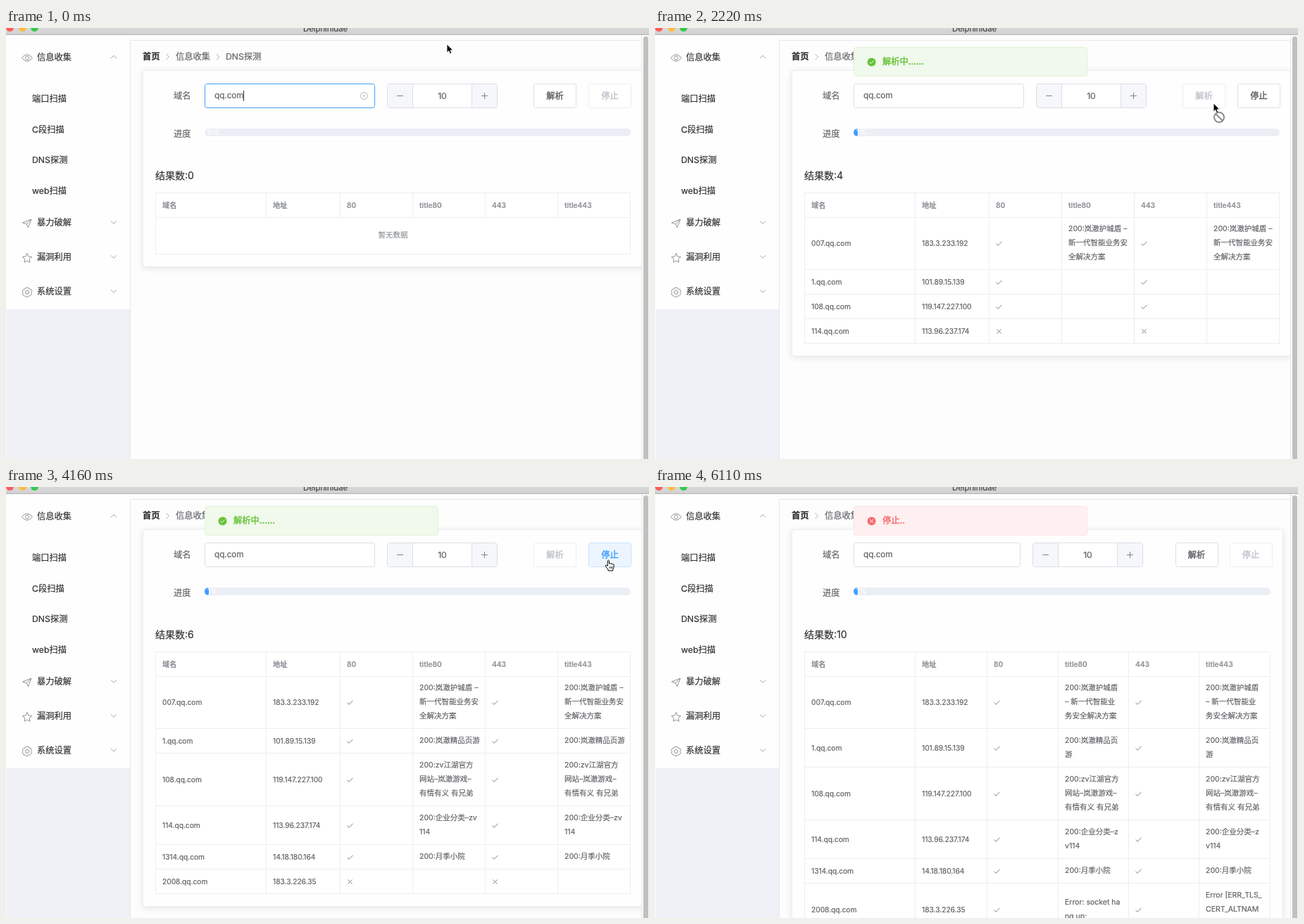
An HTML page for the animation above (6410 ms loop, 913x613 px).

```html
<!DOCTYPE html>
<html lang="zh-CN">
<head>
<meta charset="utf-8">
<title>DNS探测</title>
<style>
html, body { margin: 0; width: 100%; height: 100%; overflow: hidden; }
body { position: relative; background: #fdfdfd; color: #606266; -webkit-text-stroke: .2px;
  font: 12.25px/20px Inter, "Noto Sans CJK SC", "Noto Sans CJK", sans-serif; }
body * { box-sizing: border-box; }
.a, .t, .btn, svg { position: absolute; }
.t { white-space: nowrap; }
svg { overflow: visible; fill: none; stroke: #909399; left: 0; top: 0; }
.dark { color: #303133; }
#bar { left: 0; top: 0; width: 913px; height: 10px; overflow: hidden; z-index: 5;
  background: linear-gradient(#d9d8d9, #d2d1d2); border-bottom: 1px solid #b4b3b4; }
#bar i { position: absolute; top: -6px; width: 11px; height: 11px; border-radius: 50%; }
#page { left: 0; top: 0; width: 902px; height: 613px; overflow: hidden; clip-path: inset(10px 0 0 0); }
#card { left: 194px; top: 60px; background: #fefefe; border: 1px solid #ebeef5;
  border-radius: 4px; box-shadow: 0 2px 10px rgba(0, 0, 0, .1); }
.box, .btn { top: 78.5px; height: 35px; border: 1px solid #dcdfe6; border-radius: 3.5px; background: #fff; }
#num { width: 157px; text-align: center; line-height: 33px; overflow: hidden; }
#num b { position: absolute; top: 0; width: 36px; height: 100%; background: #f5f7fa; }
#num b::before, #num b.plus::after { content: ""; position: absolute; left: 13px; top: 16px;
  width: 9px; height: 1px; background: #7f8288; }
#num b.plus::after { transform: rotate(90deg); }
.btn { width: 61px; text-align: center; line-height: 33px; }
.btn, #msg { font-weight: 500; -webkit-text-stroke: .45px; }
.btn.off { color: #c0c4cc; border-color: #ebeef5; }
.btn.hover { color: #409eff; border-color: #c6e2ff; background: #ecf5ff; }
.btn.press { color: #3a8ee6; border-color: #3a8ee6; background: #ecf5ff; }
.btn.fade { color: #b1bdd6; border-color: #d3e3fb; }
#track { left: 282px; top: 143px; height: 11px; border-radius: 6px; background: #ebeef5; overflow: hidden; }
#fill { height: 11px; border-radius: 6px; background: #409eff; }
#track span { position: absolute; left: 4px; top: -3px; line-height: 18px; color: #fff; font-size: 10.5px; }
#table { left: 212px; top: 234px; border: solid #ebeef5; border-width: 1px 0 0 1px; font-size: 10.2px; background: #fff; }
.row { display: grid; }
.row > div { display: flex; align-items: center; padding: 7px 0 7px 9px; white-space: nowrap;
  border: solid #ebeef5; border-width: 0 1px 1px 0; }
.head { color: #909399; font-weight: 600; height: 34px; }
.cjk { font-size: 10.5px; }
.row svg { position: static; width: 9px; height: 9px; stroke: #7d8087; }
.row .none { display: block; grid-column: 1 / -1; text-align: center; height: 53px;
  padding: 16px 0; color: #909399; font-size: 10.5px; }
#msg { left: 282px; top: 27px; width: 332px; height: 42px; border: 1px solid; border-radius: 3.5px;
  padding-left: 40px; line-height: 40px; }
#msg svg { left: 18px; top: 14px; stroke: #fff; }
#msg.ok { background: #f0f9eb; border-color: #e1f3d8; color: #67c23a; }
#msg.bad { background: #fef0f0; border-color: #fde2e2; color: #f56c6c; }
#msg circle { fill: currentColor; stroke: none; }
#pointer { left: 0; top: 0; z-index: 6; }
</style>
</head>
<body>
<div id="bar" class="a">
  <i style="left:0;background:#fc5b57"></i><i style="left:18px;background:#fdbc40"></i><i style="left:35px;background:#34c84a"></i>
  <span class="t" style="left:422px;top:-9.5px;font-size:11.3px;color:#454545">Delphinidae</span>
</div>

<div id="page" class="a">
  <div class="a" style="left:0;top:16.5px;width:902px;height:1px;background:#e8e8ea"></div>
  <div class="a" style="left:1px;top:17px;width:176px;height:596px;background:#eef0f6;border-right:1px solid #e4e6ea"></div>
  <div class="a" style="left:1px;top:17px;width:175px;height:383px;background:#fefefe"></div>
  <div id="menu"></div>
  <svg width="180" height="400">
    <path d="M22.5 42.5Q30 33 37.5 42.5Q30 52 22.5 42.5Z"/><circle cx="30" cy="42.5" r="2.6"/>
    <path d="M23.5 277 36 272 31.5 284 29.3 278.8ZM29.3 278.8 36 272"/>
    <path d="M30 320.5 32 325 36.5 325.5 33.2 328.7 34 333.3 30 331 26 333.3 26.8 328.7 23.5 325.5 28 325Z"/>
    <circle cx="30" cy="376" r="2.6"/>
    <path d="M28 369.5H32L33 371.3 35.3 371.6 36.8 374.6 35.6 376.2 36.5 378.3 34.4 381 32.4 381.2 31 382.5H28.5L27 381.2 25 380.8 23.3 378 24.3 376.2 23.2 374.2 24.8 371.6 27 371.3Z"/>
    <path d="M149 43 153 39.2 157 43M149 274.5 153 278.3 157 274.5M149 323.5 153 327.3 157 323.5M149 372.5 153 376.3 157 372.5" stroke-opacity=".8"/>
  </svg>
  <b class="t dark" style="left:194px;top:31px">首页</b>
  <span class="t" style="left:241px;top:31px">信息收集</span>
  <span class="t" style="left:312px;top:31px">DNS探测</span>
  <svg width="320" height="60" stroke-opacity=".75"><path d="M227.5 37 231.5 41 227.5 45M299 37 303 41 299 45"/></svg>

  <div id="card" class="a"></div>
  <span class="t" style="left:238px;top:86.5px">域名</span>
  <span class="t" style="left:238px;top:140.5px">进度</span>
  <div id="field" class="a box" style="left:282px">
    <span class="t" style="left:13px;top:6px;font-size:11.7px">qq.com</span>
    <i id="caret" class="a" style="left:54px;top:9px;width:1px;height:15px;background:#303133"></i>
    <svg id="clear" style="left:220px;top:11.5px" width="11" height="11" stroke-opacity=".7"><circle cx="5.5" cy="5.5" r="5"/><path d="M3.8 3.8 7.2 7.2M7.2 3.8 3.8 7.2"/></svg>
  </div>
  <div id="num" class="a box"><b style="left:0;border-right:1px solid #dcdfe6"></b>10<b class="plus" style="right:0;border-left:1px solid #dcdfe6"></b></div>
  <div id="parse">解析</div>
  <div id="stop">停止</div>
  <div id="track" class="a"><div id="fill"></div><span id="pct"></span></div>
  <span id="count" class="t dark" style="left:212px;top:200px;font-size:14px"></span>
  <div id="table" class="a"></div>
  <div id="msg" class="a"></div>
</div>

<div class="a" style="left:902px;top:10px;width:11px;height:603px;background:#fafafa;border-left:1px solid #e6e6e6"></div>
<div class="a" style="left:905px;top:12px;width:7px;height:610px;background:#c0c0c0;border-radius:4px"></div>
<svg id="pointer" width="30" height="40"></svg>

<script>
const $ = id => document.getElementById(id);
const LOOP = 6410;

const menu = [[44, 42, '信息收集'], [37, 101, '端口扫描'], [37, 145, 'C段扫描'], [37, 188, 'DNS探测'],
  [37, 232, 'web扫描'], [44, 277, '暴力破解'], [44, 326, '漏洞利用'], [44, 375, '系统设置']];
$('menu').innerHTML = menu.map(([x, y, s]) =>
  `<span class="t dark" style="left:${x}px;top:${y - 10}px">${s}</span>`).join('');

// host, address, title lines in the wide and the narrow layout, narrow title443 if different
const hosts = [
  ['007', '183.3.233.192', '200:岚澈护城盾 –|新一代智能业务安|全解决方案', '200:岚澈护城盾|– 新一代智能业|务安全解决方案'],
  ['1', '101.89.15.139', '200:岚澈精品页游', '200:岚澈精品页|游'],
  ['108', '119.147.227.100', '200:zv江湖官方|网站–岚澈游戏–|有情有义 有兄弟', '200:zv江湖官方|网站–岚澈游戏–|有情有义 有兄弟'],
  ['114', '113.96.237.174', '200:企业分类–zv|114', '200:企业分类–z|v114'],
  ['1314', '14.18.180.164', '200:月季小院', '200:月季小院'],
  ['2008', '183.3.226.35', '', 'Error: socket ha|ng up;', 'Error [ERR_TLS_|CERT_ALTNAM|E_INVALID]']
];
const heads = ['域名', '地址', '80', 'title80', '443', 'title443'];

const wide = { cols: [157, 105, 103, 103, 103, 103], field: 242, num: 541, parse: 749, stop: 827, track: 605, card: 710 };
const narrow = { cols: [157, 102, 101, 100, 100, 101], field: 237, num: 536, parse: 738.5, stop: 815.5, track: 592, card: 698 };

const icon = d => `<svg viewBox="0 0 9 9"><path d="${d}"/></svg>`;
const tick = icon('M.5 4.8 3.2 7.3 8.5 1.8');
const cross = icon('M1.5 1.5 7.5 7.5M7.5 1.5 1.5 7.5');

const arrow = '<path d="M0 0V12.2L2.8 9.6 4.6 13.8 6.8 12.8 5 8.8H8.8Z" fill="#000" stroke="#fff" stroke-width=".9"/>';
const shapes = {
  arrow,
  deny: arrow + '<circle cx="8" cy="20" r="7" fill="#fff" stroke="#8c8c8c" stroke-width="2"/><path d="M3 15 13 25" stroke="#8c8c8c" stroke-width="2"/>',
  hand: '<path d="M-2.2 8.5V1Q-1.2-.8 0 1V5Q1.2 4 2.4 5.3 3.6 4.4 4.6 5.8 6.4 5.2 6.6 7V10Q6.4 12 5.2 13V15H-1.6V13.4L-5.4 8.6Q-5.4 6.6-3.4 7.4Z" fill="#fff" stroke="#000"/><path d="M.6 9V12M2.6 9V12M4.4 9V12" stroke="#000" stroke-width=".8"/>'
};
const notes = {
  ok: ['解析中......', 'M3.6 6.6 5.6 8.5 9.4 4.6'],
  bad: ['停止..', 'M4.2 4.2 8.8 8.8M8.8 4.2 4.2 8.8']
};

// rows: one digit per host, 0 = closed, 1 = open, 2 = open with title
// msg: kind, vertical offset, opacity
const steps = [
  [0, { lay: wide, focus: 1, caret: 1, ptr: ['arrow', 626, 23], parse: '', stop: 'off', pct: 0, fill: 0, count: 0, rows: '', msg: null }],
  [450, { ptr: ['arrow', 634, 34] }],
  [600, { caret: 0, ptr: ['arrow', 668, 72] }],
  [750, { ptr: ['arrow', 722, 124] }],
  [890, { ptr: ['arrow', 782, 158] }],
  [1040, { caret: 1, ptr: ['arrow', 818, 150] }],
  [1190, { ptr: ['arrow', 814, 128] }],
  [1330, { ptr: ['hand', 798, 110], parse: 'hover' }],
  [1480, { ptr: ['hand', 793, 107] }],
  [1630, { focus: 0, parse: 'press' }],
  [1780, { ptr: ['deny', 793, 107], parse: 'fade', stop: '', pct: 1, count: 1, rows: '0', msg: ['ok', -43, .35] }],
  [1930, { parse: 'off', fill: 2, count: 2, rows: '10', msg: ['ok', -12, .85] }],
  [2070, { fill: 5, count: 4, rows: '1110', msg: ['ok', -1, 1] }],
  [2220, { fill: 6, rows: '2110', msg: ['ok', 0, 1] }],
  [2520, { ptr: ['deny', 800, 107], rows: '2210' }],
  [2670, { ptr: ['arrow', 818, 108] }],
  [2820, { ptr: ['hand', 840, 107], stop: 'hover', rows: '2220' }],
  [2960, { ptr: ['hand', 853, 105], count: 5, rows: '22210' }],
  [3110, { ptr: ['hand', 856.5, 104] }],
  [3260, { rows: '22220' }],
  [4160, { count: 6, rows: '222220' }],
  [4310, { lay: narrow, count: 8, rows: '222222' }],
  [4460, { count: 10, msg: ['ok', -10, .75] }],
  [4610, { msg: ['ok', -29.5, .16] }],
  [4760, { msg: null }],
  [5360, { ptr: ['deny', 857, 105], parse: '', stop: 'off', msg: ['bad', -30, .2] }],
  [5510, { msg: ['bad', -5, .9] }],
  [5660, { ptr: ['arrow', 835, 170], msg: ['bad', 0, 1] }],
  [5810, { ptr: ['arrow', 770, 310] }],
  [5960, { ptr: ['arrow', 725, 409] }],
  [6110, { ptr: null }]
];
steps.forEach((s, i) => { if (i) s[1] = { ...steps[i - 1][1], ...s[1] }; });

const lines = s => `<span class="cjk">${s.replace(/\|/g, '<br>')}</span>`;

function tableHtml({ lay, rows }) {
  const row = (cells, cls = '') => `<div class="row ${cls}" style="grid-template-columns:${lay.cols.map(c => c + 'px').join(' ')}">` +
    cells.map(c => `<div>${c}</div>`).join('') + '</div>';
  const body = [...rows].map((level, i) => {
    const [host, ip, long, short, alt] = hosts[i];
    const title = level < 2 ? '' : lay === wide ? long : short;
    const mark = level > 0 ? tick : cross;
    return row([host + '.qq.com', ip, mark, lines(title), mark, lines(title && alt || title)]);
  }).join('');
  return row(heads, 'head') + (body || '<div class="row"><div class="none">暂无数据</div></div>');
}

function show(s) {
  const px = (id, prop, v) => { $(id).style[prop] = v + 'px'; };
  const seen = (id, on) => { $(id).style.display = on ? '' : 'none'; };
  const { lay } = s;
  px('field', 'width', lay.field);
  px('num', 'left', lay.num);
  px('track', 'width', lay.track);
  px('fill', 'width', s.fill);
  for (const id of ['parse', 'stop']) {
    px(id, 'left', lay[id]);
    $(id).className = 'btn ' + s[id];
  }
  $('field').style.borderColor = s.focus ? '#409eff' : '';
  seen('caret', s.focus && s.caret);
  seen('clear', s.focus);
  $('pct').textContent = s.pct + '%';
  $('count').textContent = '结果数:' + s.count;
  $('table').innerHTML = tableHtml(s);
  px('card', 'width', lay.card);
  px('card', 'height', $('table').offsetHeight + 192);

  seen('msg', s.msg);
  if (s.msg) {
    const [kind, dy, alpha] = s.msg, [text, mark] = notes[kind], m = $('msg');
    m.className = 'a ' + kind;
    m.style.transform = `translateY(${dy}px)`;
    m.style.opacity = alpha;
    m.innerHTML = `<svg width="13" height="13"><circle cx="6.5" cy="6.5" r="6"/><path d="${mark}"/></svg>${text}`;
  }
  seen('pointer', s.ptr);
  if (s.ptr) {
    const [shape, x, y] = s.ptr;
    $('pointer').innerHTML = `<g transform="translate(${x} ${y})">${shapes[shape]}</g>`;
  }
}

let current = -1;
const start = performance.now();
function play() {
  const t = (performance.now() - start) % LOOP;
  const i = steps.findLastIndex(s => s[0] <= t);
  if (i !== current) show(steps[current = i][1]);
  requestAnimationFrame(play);
}
play();
</script>
</body>
</html>
```
